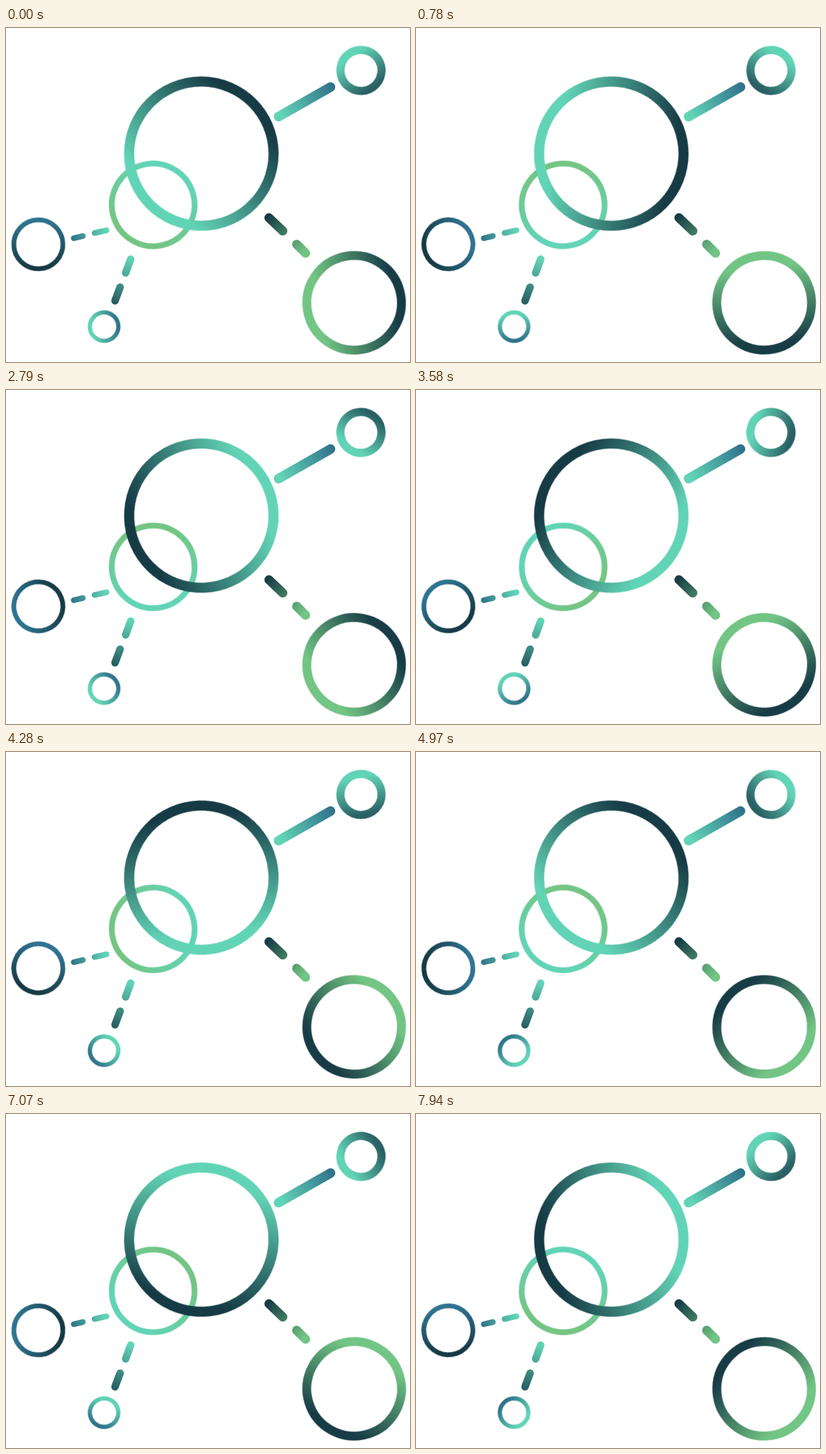
An HTML page for the animation above (8 s loop, 593 by 491 pixels).

```html
<!DOCTYPE html>
<html lang="en">
<head>
<meta charset="utf-8">
<title>Connected rings</title>
<style>
  html, body { margin: 0; width: 100%; height: 100%; overflow: hidden; background: #fff; }
  svg { display: block; width: 100%; height: 100%; }
  circle { fill: none; }
  line { stroke-linecap: round; }

  /* Each ring turns at its own pace: --period in seconds, --start in degrees. */
  .ring {
    transform-origin: 0 0;
    animation: spin 8s steps(103) -8ms infinite;
  }
  @keyframes spin {
    from { transform: rotate(calc(var(--start) * 1deg)); }
    to { transform: rotate(calc((var(--start) + 8 / var(--period) * 360) * 1deg)); }
  }
</style>
</head>
<body>
<svg viewBox="0 0 593 491">
  <defs>
    <!-- Ring gradients run from the light side to the accent side -->
    <linearGradient id="mintNight">
      <stop offset=".1" stop-color="#62d4b6"/><stop offset=".93" stop-color="#163b45"/>
    </linearGradient>
    <linearGradient id="leafNight">
      <stop offset=".12" stop-color="#72c584"/><stop offset=".93" stop-color="#173c46"/>
    </linearGradient>
    <linearGradient id="mintPine">
      <stop offset=".08" stop-color="#62d4b6"/><stop offset="1" stop-color="#2a6064"/>
    </linearGradient>
    <linearGradient id="mintLeaf">
      <stop offset=".1" stop-color="#62d4b6"/><stop offset=".92" stop-color="#74c583"/>
    </linearGradient>
    <linearGradient id="blueNight">
      <stop offset=".06" stop-color="#2f7390"/><stop offset=".94" stop-color="#163a44"/>
    </linearGradient>
    <linearGradient id="mintBlue">
      <stop offset=".1" stop-color="#62d4b6"/><stop offset="1" stop-color="#2f728a"/>
    </linearGradient>

    <!-- Connector gradients span the whole broken line -->
    <linearGradient id="toTopRight" gradientUnits="userSpaceOnUse" x1="398" y1="131" x2="482" y2="84">
      <stop offset=".06" stop-color="#62d4b6"/><stop offset="1" stop-color="#2f708a"/>
    </linearGradient>
    <linearGradient id="toBottomRight" gradientUnits="userSpaceOnUse" x1="382" y1="275" x2="444" y2="335">
      <stop offset=".04" stop-color="#173c45"/><stop offset=".9" stop-color="#72c584"/>
    </linearGradient>
    <linearGradient id="toLeft" gradientUnits="userSpaceOnUse" x1="95" y1="310" x2="152" y2="297">
      <stop offset="0" stop-color="#2f7288"/><stop offset=".9" stop-color="#62d4b6"/>
    </linearGradient>
    <linearGradient id="toBottom" gradientUnits="userSpaceOnUse" x1="185" y1="335" x2="158" y2="406">
      <stop offset=".06" stop-color="#62d4b6"/><stop offset="1" stop-color="#265a60"/>
    </linearGradient>
  </defs>

  <g stroke="url(#toTopRight)" stroke-width="14">
    <line x1="400" y1="130.3" x2="476.3" y2="86.8"/>
  </g>
  <g stroke="url(#toBottomRight)" stroke-width="13.4">
    <line x1="386" y1="279" x2="406.3" y2="298.3"/>
    <line x1="426.7" y1="318" x2="439.7" y2="331"/>
  </g>
  <g stroke="url(#toLeft)" stroke-width="8.4">
    <line x1="99.5" y1="309" x2="112.8" y2="305.8"/>
    <line x1="130" y1="301.3" x2="147.5" y2="297.4"/>
  </g>
  <g stroke="url(#toBottom)" stroke-width="11">
    <line x1="183" y1="339.8" x2="175.6" y2="360"/>
    <line x1="167.5" y1="381" x2="160" y2="401"/>
  </g>

  <g transform="translate(216 260)">
    <circle class="ring" r="60.7" stroke="url(#mintLeaf)" stroke-width="8.4" style="--start: 121; --period: 2"/>
  </g>
  <g transform="translate(286.7 184.7)">
    <circle class="ring" r="106" stroke="url(#mintNight)" stroke-width="14.8" style="--start: -45; --period: 5"/>
  </g>
  <g transform="translate(521 62.4)">
    <circle class="ring" r="30.2" stroke="url(#mintPine)" stroke-width="12" style="--start: 54; --period: 4"/>
  </g>
  <g transform="translate(511 404)">
    <circle class="ring" r="69.4" stroke="url(#leafNight)" stroke-width="13" style="--start: -10; --period: 3"/>
  </g>
  <g transform="translate(47.5 318)">
    <circle class="ring" r="36" stroke="url(#blueNight)" stroke-width="7" style="--start: 88; --period: 4"/>
  </g>
  <g transform="translate(144 439)">
    <circle class="ring" r="20.9" stroke="url(#mintBlue)" stroke-width="6.2" style="--start: -10; --period: 3"/>
  </g>
</svg>
</body>
</html>
```
